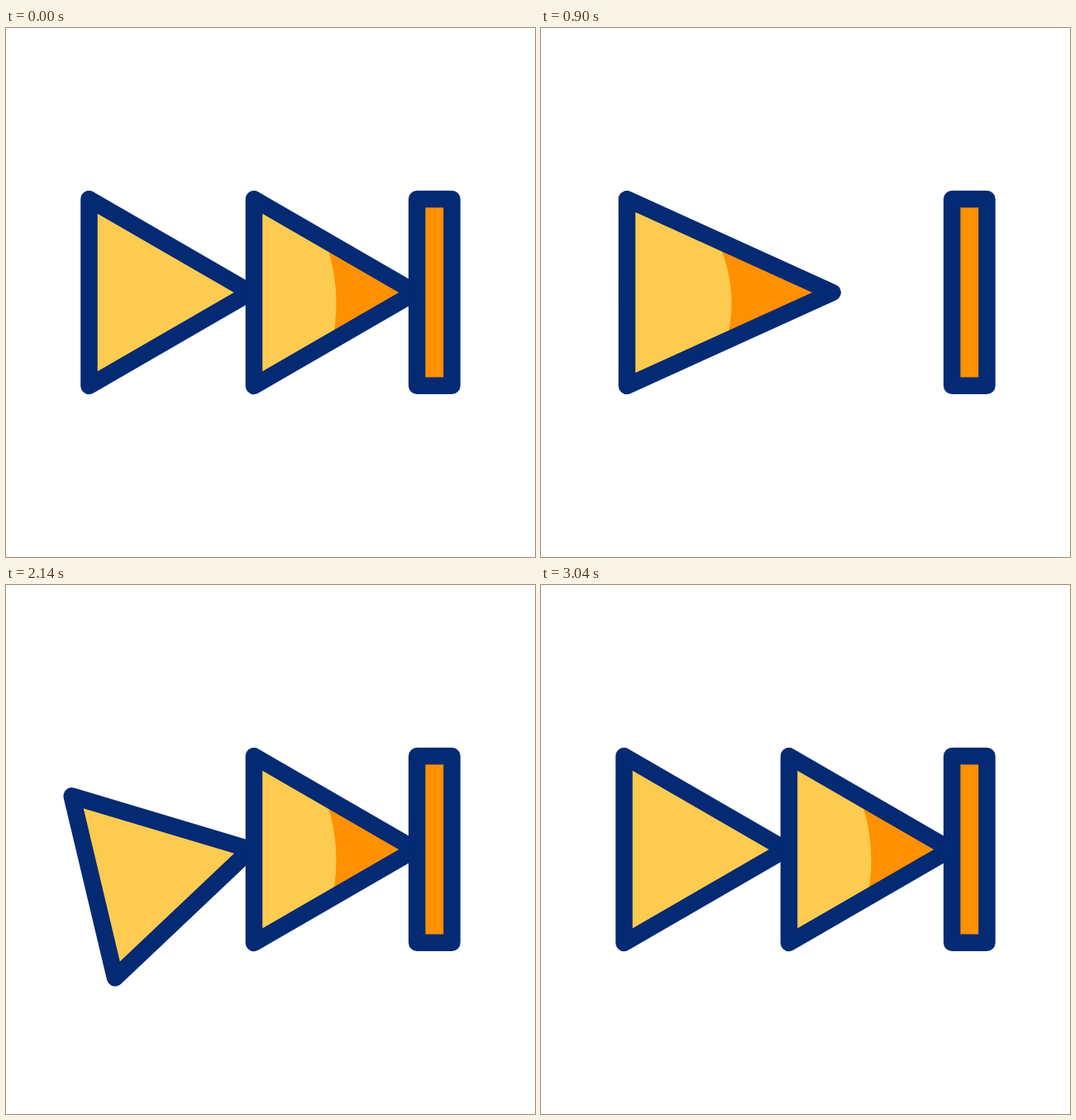
These frames come from a looping animation (640 by 640 pixels, 3.6 s). An HTML page with a canvas:

```html
<!DOCTYPE html>
<html>
<head>
<meta charset="utf-8">
<style>
html, body { margin: 0; width: 100%; height: 100%; overflow: hidden; background: #fff; }
canvas { display: block; }
</style>
</head>
<body>
<canvas id="stage" width="640" height="640"></canvas>
<script>
const ctx = document.getElementById('stage').getContext('2d');
const NAVY = '#042a74', YELLOW = '#fdcb50', ORANGE = '#ff9000';
const LOOP = 3600, EXIT = 500, HIT = 1020, DELAY = 1080;
const SPEED = 1.2, WIDTH = 195.5, HALF = 113;

// Swing after the hit: time in ms, angle in degrees
const SWING = [[HIT, 0], [1085, -16], [1265, 15], [1455, -10], [1640, 4.8], [1830, -4], [1960, 0]];

function swing(t) {
  const i = SWING.findIndex(key => key[0] > t);
  if (i < 0 || i === 0) return 0;
  const [t0, a0] = SWING[i - 1], [t1, a1] = SWING[i];
  const p = (t - t0) / (t1 - t0);
  const ease = i === 1 ? Math.sin(p * Math.PI / 2) : (1 - Math.cos(p * Math.PI)) / 2;
  return a0 + (a1 - a0) * ease;
}

// Offset, stretch and angle of a triangle that arrives `delay` ms late
function pose(t, delay) {
  if (t < EXIT) return { dx: 420 * (t / EXIT) ** 2, stretch: 1, angle: 0 };
  const u = t - delay;
  if (u >= HIT) return { dx: 0, stretch: 1, angle: swing(u) };
  const p = Math.max(0, (u - 600) / (HIT - 600));
  return { dx: (u - HIT) * SPEED, stretch: 1 + 0.56 * (1 - p * p), angle: 0 };
}

function trianglePath(stretch) {
  ctx.beginPath();
  ctx.moveTo(0, 0);
  ctx.lineTo(-WIDTH * stretch, -HALF);
  ctx.lineTo(-WIDTH * stretch, HALF);
  ctx.closePath();
}

function triangle(tip, { dx, stretch, angle }, shaded) {
  ctx.save();
  ctx.translate(tip + dx, 320);
  ctx.rotate(angle * Math.PI / 180);
  trianglePath(stretch);
  ctx.fillStyle = shaded ? ORANGE : YELLOW;
  ctx.fill();
  if (shaded) {
    ctx.save();
    ctx.clip();
    ctx.beginPath();
    ctx.ellipse(-315 * stretch, 13, 219 * stretch, 219, 0, 0, 2 * Math.PI);
    ctx.fillStyle = YELLOW;
    ctx.fill();
    ctx.restore();
    trianglePath(stretch);
  }
  ctx.stroke();
  ctx.restore();
}

function bar() {
  ctx.beginPath();
  ctx.rect(497.2, 207, 42.3, 225.8);
  ctx.fillStyle = ORANGE;
  ctx.fill();
  ctx.stroke();
}

function draw(t) {
  ctx.fillStyle = '#fff';
  ctx.fillRect(0, 0, 640, 640);
  ctx.strokeStyle = NAVY;
  ctx.lineWidth = 20.5;
  ctx.lineJoin = 'round';
  // Nothing shows past the bar
  ctx.save();
  ctx.beginPath();
  ctx.rect(0, 0, 518, 640);
  ctx.clip();
  triangle(296, pose(t, DELAY), false);
  triangle(495.5, pose(t, 0), true);
  ctx.restore();
  bar();
}

const start = performance.now();
function tick() {
  draw((performance.now() - start) % LOOP);
  requestAnimationFrame(tick);
}
tick();
</script>
</body>
</html>
```
